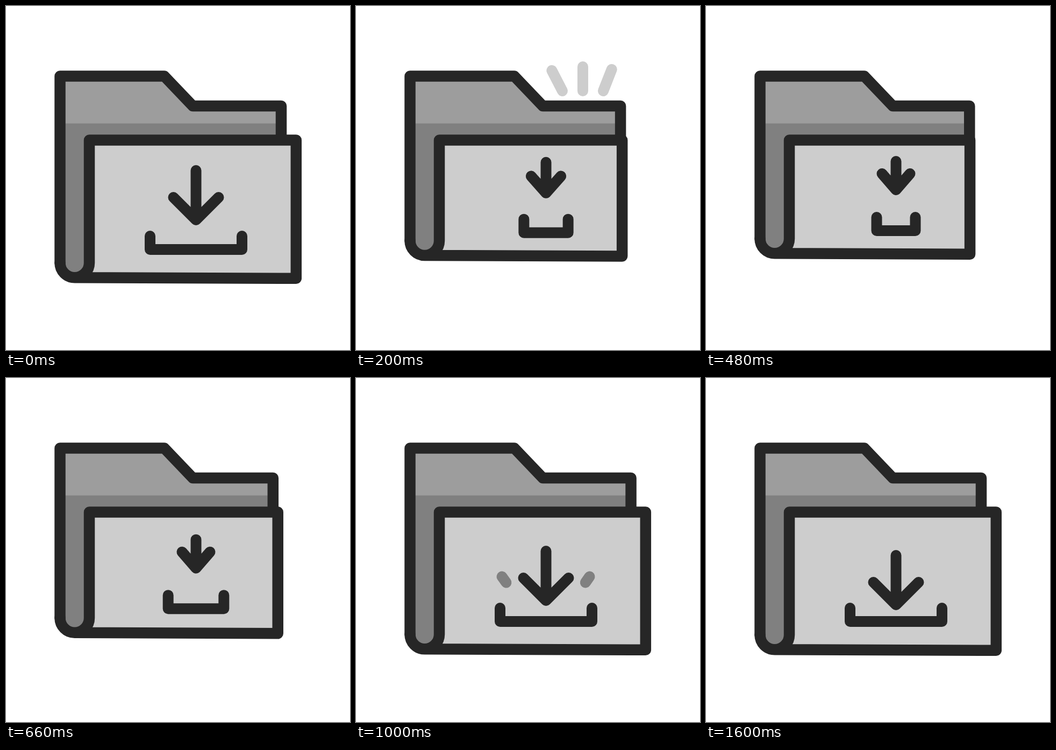
Recreate the animation shown at these times as an HTML page. Size 640x640 px, loop 2400 ms.

```html
<!DOCTYPE html>
<html lang="en">
<head>
<meta charset="utf-8">
<title>Download folder</title>
<style>
  html, body { margin: 0; width: 100%; height: 100%; overflow: hidden; background: #fff; }
  svg { display: block; width: 100vw; height: 100vh; }
  path { fill: none; stroke-linecap: round; stroke-linejoin: round; }
  .ink { stroke: #262626; stroke-width: 20.5; }
  .icon { stroke: #262626; stroke-width: 20; }
  .rays { stroke: #cdcdcd; stroke-width: 20; }
  .splash { stroke: #808080; stroke-width: 20; }
</style>
</head>
<body>
<svg viewBox="0 0 640 640">
  <path class="rays" id="rays"/>
  <path id="tab" style="fill:#9d9d9d"/>
  <path id="shade" style="fill:#808080"/>
  <path class="ink" id="back"/>
  <path id="panel" style="fill:#cdcdcd"/>
  <path class="ink" id="front"/>
  <path class="splash" id="splash"/>
  <path class="icon" id="tray"/>
  <path class="icon" id="arrow"/>
</svg>
<script>
const LOOP = 2400, END = 1600, STEP = 20;
const MID = 353.5;

const clamp = x => Math.max(0, Math.min(1, x));
const ramp = (t, a, b) => clamp((t - a) / (b - a));
const ease = (t, a, b) => { const p = ramp(t, a, b); return p * p * (3 - 2 * p); };
const mix = (a, b, k) => a + (b - a) * k;
const set = (id, d) => document.getElementById(id).setAttribute('d', d);

// Part of a line between two fractions of its length
function trim([x1, y1, x2, y2], tail, head) {
  if (head - tail < 0.01) return '';
  const at = k => `${mix(x1, x2, k)} ${mix(y1, y2, k)}`;
  return `M${at(tail)}L${at(head)}`;
}

const rays = [[384, 158, 354, 100], [422, 158, 422, 89.5], [460, 158, 484, 97]];
const splash = [[302, 412, 271.5, 369.5], [405, 412, 434.5, 369.5]];

// Height of the arrow's bounce: drop, rebound, settle
function bounce(t) {
  if (t < 894) return 24 * ramp(t, 771, 894) ** 2;
  if (t < 1168) return 24 * (1 - ease(t, 894, 1168));
  return 24 * ease(t, 1168, 1600);
}

function draw(t) {
  const shrink = ease(t, 0, 250);
  const body = shrink - ease(t, 425, 1052);
  const base = shrink - ease(t, 480, 957);
  const size = shrink - ease(t, 660, 976);

  const right = mix(539.8, 490, body);
  const backRight = mix(512, 489.8, body);
  const cy = mix(478, 432, body);
  const low = cy + 27.25;
  const outline = `M100.5 ${cy}V130.5H294.5L347.5 186H${backRight}V250`;

  set('tab', `${outline}H100.5Z`);
  set('shade', `M100.5 218.5H${backRight}V250H155V${cy}A27.25 27.25 0 0 1 100.5 ${cy}Z`);
  set('back', outline);
  set('panel', `M155 249.5H${right}V${low + 1.5}L155 ${low}Z`);
  set('front', `M100.5 ${cy}A27.25 27.25 0 0 0 155 ${cy}V249.5H${right}V${low + 1.5}L127.75 ${low}`);

  const half = mix(85.5, 36, base), top = mix(428, 393, base);
  set('tray', `M${MID - half} ${top}v25h${2 * half}v-25`);

  const len = mix(92, 53, size), wing = mix(42, 26, size), rise = mix(42, 30, size);
  const tip = mix(352, 315.5, base) + bounce(t) + len / 2;
  set('arrow', `M${MID} ${tip - len}V${tip}M${MID - wing} ${tip - rise}L${MID} ${tip}L${MID + wing} ${tip - rise}`);

  const rayTail = ease(t, 200, 340), rayHead = ease(t, 100, 265);
  set('rays', rays.map(r => trim(r, rayTail, rayHead)).join(''));
  const dropTail = ease(t, 920, 1040), dropHead = ease(t, 885, 985);
  set('splash', splash.map(s => trim(s, dropTail, dropHead)).join(''));
}

function tick() {
  const t = performance.now() % LOOP;
  draw(Math.min(END, Math.floor(t / STEP) * STEP));
  requestAnimationFrame(tick);
}
tick();
</script>
</body>
</html>
```
